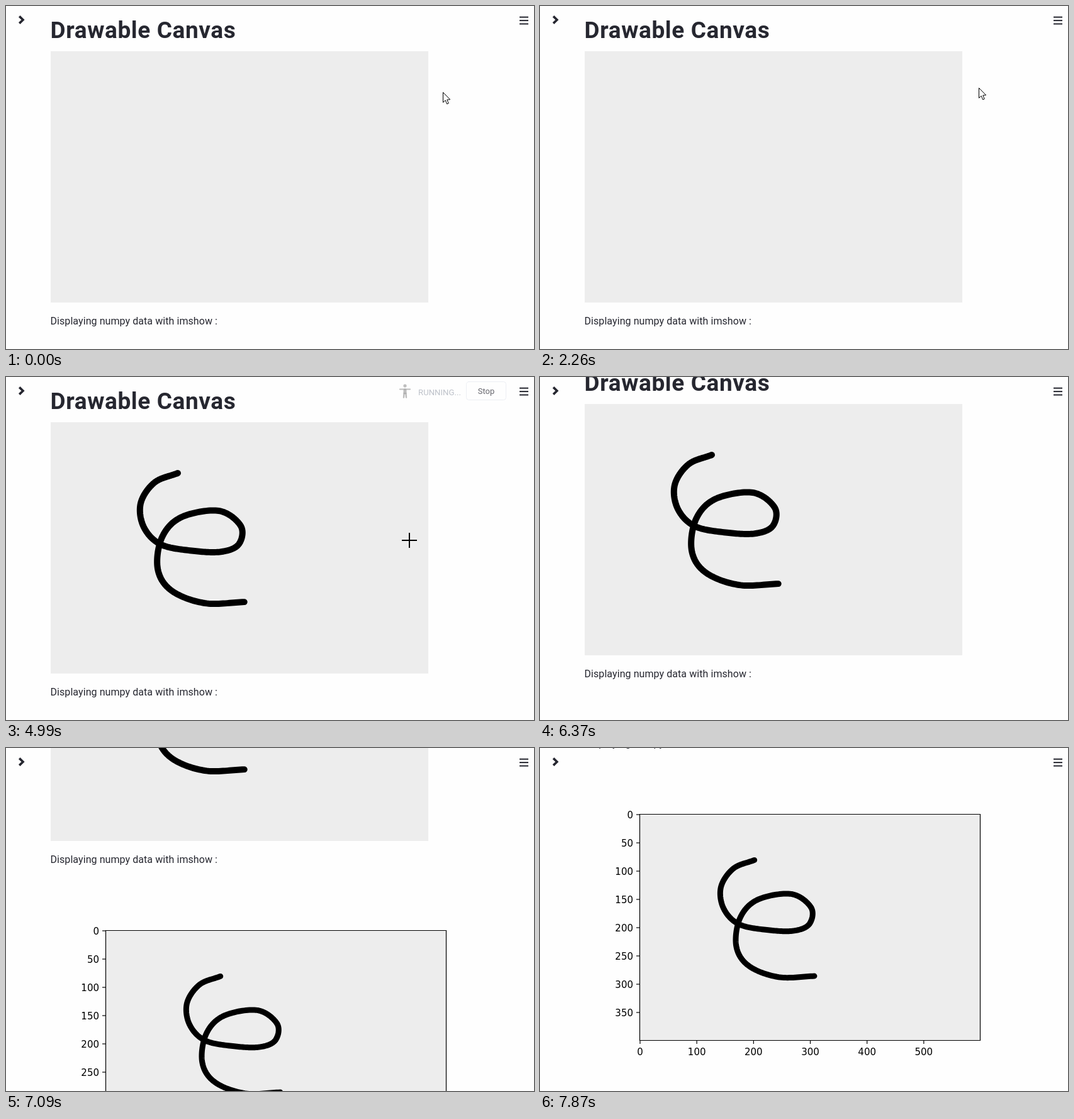
An HTML page with a canvas that plays this animation: 839x546 px, repeating every 8000 ms.

```html
<!DOCTYPE html>
<html lang="en">
<head>
<meta charset="utf-8">
<title>Drawable Canvas</title>
<style>
  html, body { margin: 0; width: 100%; height: 100%; overflow: hidden; background: #fefefe; }
  canvas { display: block; }
</style>
</head>
<body>
<canvas id="stage" width="839" height="546"></canvas>
<script>
const ctx = document.getElementById('stage').getContext('2d');
const LOOP = 8000;
const INK = '#262730';
const PAPER = '#fefefe';
const PAD = { x: 71, y: 72, w: 600, h: 400 };
const PLOT = { x: 158.5, y: 614.5, w: 541, h: 360 };

// Motion advances in even ticks, like a screen recording.
const TICK = 137.1, PHASE = 52;
const ENTER = 16, PRESS = 25, RELEASE = 34, RUN_START = 36, RUN_END = 44;

// Key points: [tick, values...]
const IDLE = [[1, 694, 137], [3, 710, 131]];
const APPROACH = [[ENTER, 697, 130], [19, 545, 121], [22, 366, 136], [24, 256, 157]];
const LEAVE = [[RELEASE, 381, 359], [36, 641, 260], [37, 730, 210]];
const SCROLL = [[45, 0], [46, 29], [48, 158], [51, 324], [57, 509]];

const CURVE = [
  [273, 153], [236, 168], [214, 201], [219, 239], [247, 267], [300, 277], [343, 278], [370, 266],
  [373, 237], [338, 213], [279, 223], [248, 255], [241, 305], [263, 340], [316, 360], [382, 358]
].map((point, i) => [i, ...point]);

const clamp = (v, lo, hi) => Math.min(hi, Math.max(lo, v));

// Smooth cubic path through the keys, held still beyond both ends.
function glide(keys, time) {
  const last = keys.length - 1;
  const t = clamp(time, keys[0][0], keys[last][0]);
  const i = clamp(keys.findLastIndex(key => key[0] <= t), 0, last - 1);
  const a = keys[i], b = keys[i + 1];
  const span = b[0] - a[0], u = (t - a[0]) / span;
  const slope = (k, c) => {
    const p = keys[Math.max(k - 1, 0)], q = keys[Math.min(k + 1, last)];
    return (q[c] - p[c]) / (q[0] - p[0]) * span;
  };
  return a.slice(1).map((_, j) => {
    const c = j + 1, ease = u * u * (3 - 2 * u);
    return a[c] + (b[c] - a[c]) * ease
      + slope(i, c) * u * (1 - u) ** 2 - slope(i + 1, c) * u * u * (1 - u);
  });
}

// Points spread along the curve, each with its distance from the start.
const stroke = [];
for (let s = 0, length = 0; s <= CURVE.length - 1; s += 0.05) {
  const [x, y] = glide(CURVE, s), prev = stroke.at(-1);
  if (prev) length += Math.hypot(x - prev.x, y - prev.y);
  stroke.push({ x, y, length });
}
const strokeLength = stroke.at(-1).length;

// The pen moves at constant speed.
function drawnStroke(tick) {
  const reach = clamp((tick - PRESS + 1) / (RELEASE - PRESS), 0, 1) * strokeLength;
  return reach ? stroke.filter(p => p.length <= reach) : [];
}

function text(str, x, y, font, color = INK, align = 'left', spacing = 0) {
  ctx.font = font;
  ctx.fillStyle = color;
  ctx.textAlign = align;
  ctx.letterSpacing = spacing + 'px';
  ctx.fillText(str, x, y);
}

function line(points, width, color, style = 'butt') {
  ctx.lineWidth = width;
  ctx.strokeStyle = color;
  ctx.lineCap = style;
  ctx.lineJoin = style === 'round' ? 'round' : 'miter';
  ctx.beginPath();
  points.forEach(([x, y]) => ctx.lineTo(x, y));
  ctx.stroke();
}

const drawStroke = points => line(points.map(p => [p.x, p.y]), 10, '#000', 'round');

function drawPlot() {
  const { x, y, w, h } = PLOT;
  const font = '15px "DejaVu Sans", sans-serif';
  ctx.fillStyle = '#ededed';
  ctx.fillRect(x, y, w, h);

  ctx.save();
  ctx.translate(x, y);
  ctx.scale(w / PAD.w, h / PAD.h);
  ctx.translate(-PAD.x, -PAD.y);
  drawStroke(stroke);
  ctx.restore();

  line([[x, y], [x + w, y], [x + w, y + h], [x, y + h], [x, y]], 1.2, '#000', 'square');
  for (let v = 0; v < PAD.h; v += 50) {
    const ty = y + 0.5 + v * h / PAD.h;
    line([[x - 5.5, ty], [x, ty]], 1.2, '#000');
    text(v, x - 10.5, ty + 5.5, font, '#000', 'right');
  }
  for (let v = 0; v < PAD.w; v += 100) {
    const tx = x + 0.5 + v * w / PAD.w;
    line([[tx, y + h], [tx, y + h + 5.5]], 1.2, '#000');
    text(v, tx, y + h + 23, font, '#000', 'center');
  }
}

function drawPage(scroll, drawn) {
  ctx.save();
  ctx.translate(0, -Math.round(scroll));
  text('Drawable Canvas', 70.5, 51, 'bold 37px Roboto, sans-serif', INK, 'left', 0.6);
  ctx.fillStyle = '#ededed';
  ctx.fillRect(PAD.x, PAD.y, PAD.w, PAD.h);
  drawStroke(drawn);
  text('Displaying numpy data with imshow :', 70.5, 507, '16px Roboto, sans-serif', INK, 'left', 0.07);
  drawPlot();
  ctx.restore();
}

function drawChrome() {
  line([[21.2, 16.4], [27, 22], [21.2, 27.6]], 3.6, INK);
  ctx.fillStyle = INK;
  for (let i = 0; i < 3; i++) ctx.fillRect(816, 16.7 + i * 5.4, 14, 2);
}

function drawRunner(phase) {
  const gray = '#a3a3a3', x = 634;
  const lift = 5 * Math.sin(phase * 2);
  const spread = 2 + 5 * Math.abs(Math.sin(phase * 1.3));
  ctx.fillStyle = gray;
  ctx.beginPath();
  ctx.arc(x, 14, 2.6, 0, Math.PI * 2);
  ctx.fill();
  line([[x - 8, 19.5 + lift], [x - 3, 19.5], [x + 3, 19.5], [x + 8, 19.5 - lift]], 2.2, gray, 'round');
  line([[x, 21], [x, 25]], 5, gray, 'round');
  for (const side of [-1, 1]) {
    line([[x + side * 1.5, 26], [x + side * spread, 32.5]], 2.4, gray, 'round');
  }
}

function drawStatus(tick) {
  const alpha = clamp(Math.min((tick - RUN_START + 1) * 0.7, (RUN_END - tick) * 0.5), 0, 1);
  if (!alpha) return;
  ctx.save();
  ctx.globalAlpha = alpha;
  drawRunner(tick - RUN_START);
  text('RUNNING...', 655, 29, '13.2px Roboto, sans-serif', '#a3a8b4');
  ctx.strokeStyle = '#e6e9ef';
  ctx.lineWidth = 1;
  ctx.beginPath();
  ctx.roundRect(731.5, 7.5, 63, 29, 4);
  ctx.stroke();
  text('Stop', 763, 27, '13px Roboto, sans-serif', INK, 'center');
  ctx.restore();
}

function drawCross(x, y) {
  ctx.fillStyle = '#000';
  ctx.fillRect(x - 1, y - 12, 2, 24);
  ctx.fillRect(x - 12, y - 1, 24, 2);
}

function drawArrow(x, y) {
  ctx.save();
  ctx.translate(x + 0.5, y + 0.5);
  ctx.fillStyle = '#fff';
  const shape = new Path2D('M0 0V16L3.7 12.6L6.2 18.5L8.8 17.4L6.3 11.7L11.2 11.4Z');
  ctx.strokeStyle = '#000';
  ctx.lineJoin = 'miter';
  ctx.lineWidth = 1;
  ctx.fill(shape);
  ctx.stroke(shape);
  ctx.restore();
}

function pointerAt(tick, drawn) {
  if (tick < ENTER) return glide(IDLE, tick);
  if (tick < PRESS) return glide(APPROACH, tick);
  if (tick < RELEASE) return [drawn.at(-1).x, drawn.at(-1).y];
  return glide(LEAVE, tick);
}

function drawPointer(tick, drawn) {
  if (tick > LEAVE.at(-1)[0]) return;
  const [x, y] = pointerAt(tick, drawn).map(Math.round);
  const overPad = x < PAD.x + PAD.w;
  (overPad ? drawCross : drawArrow)(x, y);
}

const start = performance.now();

function frame() {
  const time = (performance.now() - start) % LOOP;
  const tick = Math.floor((time - PHASE) / TICK);
  const drawn = drawnStroke(tick);
  ctx.fillStyle = PAPER;
  ctx.fillRect(0, 0, 839, 546);
  drawPage(glide(SCROLL, tick)[0], drawn);
  drawChrome();
  drawStatus(tick);
  drawPointer(tick, drawn);
  requestAnimationFrame(frame);
}
frame();
</script>
</body>
</html>
```
